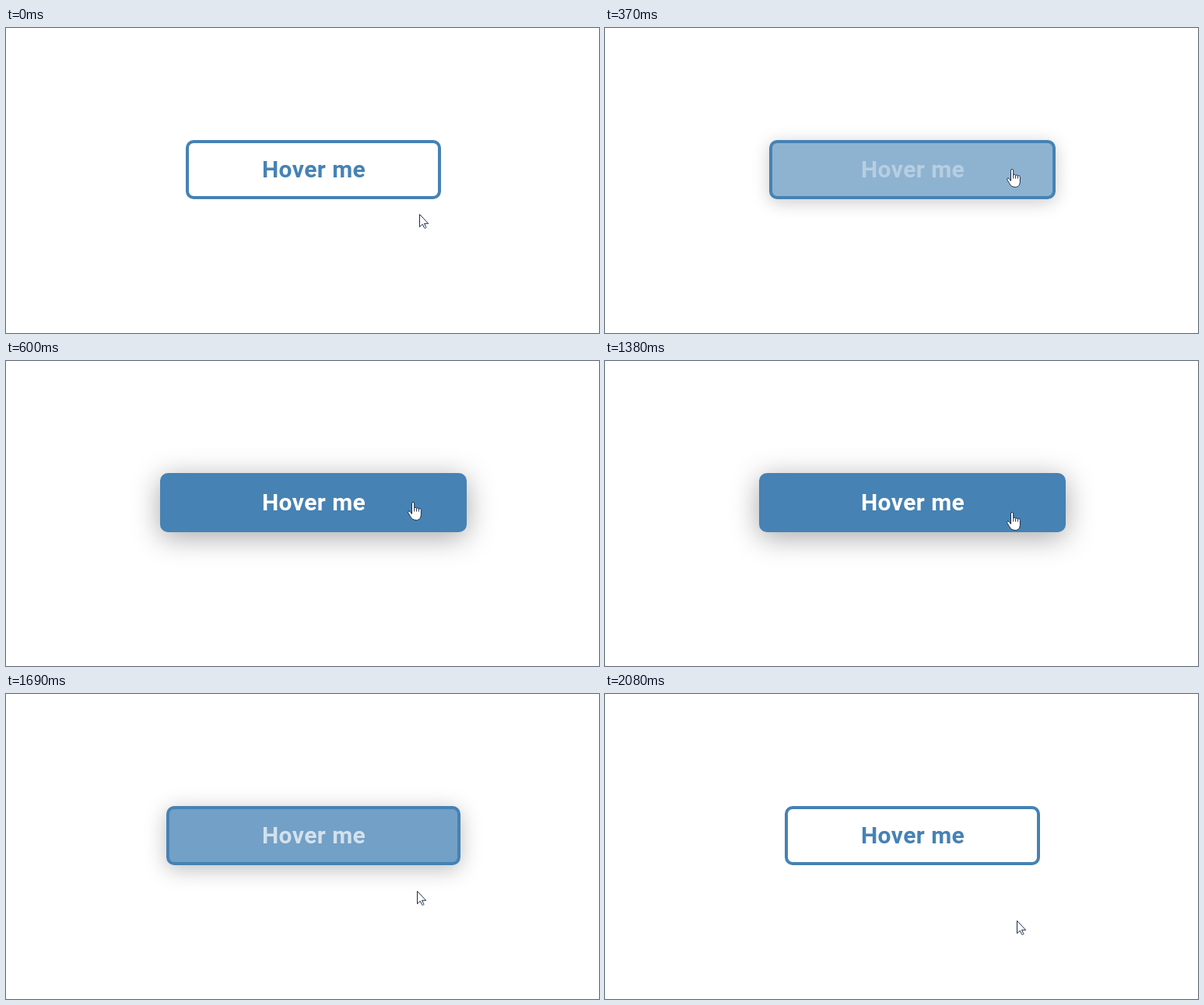
Recreate the animation shown at these times as an HTML page. Size 762x392 px, loop 2310 ms.

```html
<!DOCTYPE html>
<html lang="en">
<head>
<meta charset="utf-8">
<title>Hover button</title>
<style>
  html, body { margin: 0; width: 100%; height: 100%; overflow: hidden; background: #fff; }
  #button, #label { position: absolute; top: 144px; transform: translateX(-50%); }
  #button {
    left: 395px; height: 76px; box-sizing: border-box;
    border: 4px solid #4682b4; border-radius: 10px;
  }
  #label {
    left: 395.6px; white-space: nowrap;
    font: 600 30px/76px Roboto, sans-serif; letter-spacing: .45px;
  }
  svg {
    position: absolute; left: 0; top: 0; overflow: visible;
    fill: #fff; stroke: #1b2b45; stroke-width: 1; stroke-linejoin: round;
  }
</style>
</head>
<body>
<div id="button"></div>
<div id="label">Hover me</div>
<svg id="cursor" width="20" height="26">
  <path id="arrow" d="M.5.5v16.2l3.8-3.5 2.3 4.7q.8 1 1.9.1.6-.5.2-1.3l-2.2-4.4h5.2z"/>
  <g id="hand" transform="translate(-6 0)">
    <path d="M5.5 15.5V2.2a1.6 1.7 0 0 1 3.2 0V8c.4-1.2 2.7-1 2.9.6.5-1 2.5-.8 2.8.6.6-.9 2.9-.6 3 1.2V16c0 4.5-2.4 7.5-6 7.5S5 22 3.5 18.5L.8 14.2c-1-1.8 1.2-3 2.5-1.6z"/>
    <path fill="none" d="M8.7 8v4.5M11.6 8.6v4M14.4 9.2v3.4"/>
  </g>
</svg>
<script>
const LOOP = 2310, FADE = 464;

// The picture refreshes in even steps within each phase.
const enter = { start: 0, step: 73.9, fade: 105 };
const leave = { start: 1380, step: 76.6, fade: 1536 };

// Key points of the pointer: time, x, y
const path = [
  [0, 531, 239], [300, 522, 181], [1379, 522, 181], [1380, 522, 194],
  [1686, 528, 253], [1839, 529, 271], [2069, 529, 291]
];

const $ = id => document.getElementById(id);
const mix = (a, b, k) => a + (b - a) * k;
const clamp = x => Math.min(1, Math.max(0, x));
const ease = x => (1 - Math.cos(Math.PI * clamp(x))) / 2;
const faded = (t, phase) => ease((t - phase.fade) / FADE);

function pointer(t) {
  const i = path.findIndex(p => p[0] > t);
  const [t0, x0, y0] = path.at(i < 0 ? -1 : i - 1);
  const [t1, x1, y1] = path.at(i);
  const k = clamp((t - t0) / (t1 - t0 || 1));
  return [Math.round(mix(x0, x1, k)), Math.round(mix(y0, y1, k))];
}

function draw(t) {
  const p = faded(t, enter) - faded(t, leave);
  const button = $('button').style;
  button.width = 2 * Math.round(mix(164, 197, p)) + 'px';
  button.backgroundColor = `rgba(70, 130, 180, ${p})`;
  button.boxShadow = `0 ${6.5 * p}px ${36 * p}px rgba(0, 0, 0, ${.35 * p})`;
  $('label').style.color = `rgb(${[70, 130, 180].map(c => Math.round(mix(c, 255, p)))})`;

  const [x, y] = pointer(t);
  const over = y < 220;
  $('cursor').style.transform = `translate(${x}px, ${y}px)`;
  $('hand').style.display = over ? '' : 'none';
  $('arrow').style.display = over ? 'none' : '';
}

const begin = performance.now();
function frame() {
  const t = (performance.now() - begin) % LOOP;
  const { start, step } = t < leave.start ? enter : leave;
  draw(start + Math.floor((t - start) / step) * step);
  requestAnimationFrame(frame);
}
frame();
</script>
</body>
</html>
```
